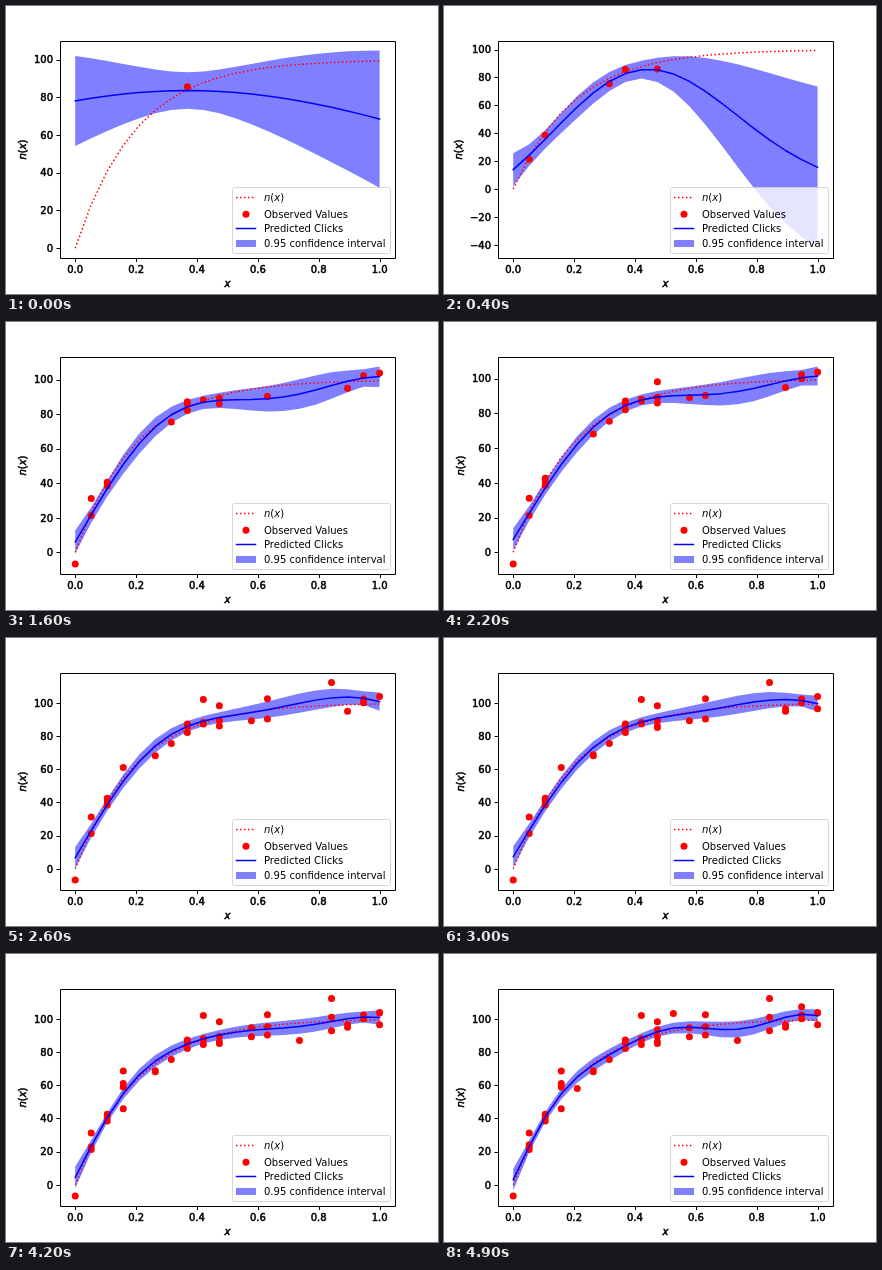
An HTML page that plays this animation: 432x288 px, repeating every 5000 ms.

```html
<!DOCTYPE html>
<html lang="en">
<head>
<meta charset="utf-8">
<title>Gaussian process regression</title>
<style>
  html, body { margin: 0; width: 100%; height: 100%; overflow: hidden; background: #fff; }
  svg { display: block; width: 100vw; height: 100vh; }
  text { font: 10px "DejaVu Sans", sans-serif; }
  .it { font-style: italic; }
  .axis text { stroke: #000; stroke-width: .5px; }
  .axis path { fill: none; stroke: #000; }
  .truth { fill: none; stroke: #f00; stroke-width: 1.5; stroke-dasharray: 1.5 2.475; }
  .mean { fill: none; stroke: #00f; stroke-width: 1.5; stroke-linecap: square; stroke-linejoin: round; }
  .band { fill: #00f; fill-opacity: .5; }
  .dot { fill: none; stroke: #f00; stroke-width: 7; stroke-linecap: round; }
</style>
</head>
<body>
<svg viewBox="0 0 432 288">
  <clipPath id="area"><rect x="54" y="34.56" width="334.8" height="217.44"/></clipPath>
  <g clip-path="url(#area)">
    <path class="band" id="band"/>
    <path class="truth" id="truth"/>
    <path class="dot" id="dots"/>
    <path class="mean" id="mean"/>
  </g>
  <g class="axis">
    <path d="M54.5 35.5H389.5V252.5H54.5Z"/>
    <path id="marks"/>
    <g id="xnums" text-anchor="middle"></g>
    <g id="ynums" text-anchor="end"></g>
    <text class="it" x="221.4" y="281" text-anchor="middle">x</text>
    <text id="ylabel" text-anchor="middle"><tspan class="it">n</tspan>(<tspan class="it">x</tspan>)</text>
  </g>
  <g>
    <rect x="226.5" y="181.5" width="158" height="66" rx="2" fill="#fff" fill-opacity=".8" stroke="#ccc" stroke-opacity=".8"/>
    <path class="truth" d="M230 191.5h20"/>
    <path class="dot" d="M240 208.3h0"/>
    <path class="mean" d="M230.5 222.5h19"/>
    <rect class="band" x="230" y="234" width="20" height="7"/>
    <text x="258" y="195"><tspan class="it">n</tspan>(<tspan class="it">x</tspan>)</text>
    <text x="258" y="211.5">Observed Values</text>
    <text x="258" y="226.3">Predicted Clicks</text>
    <text x="258" y="241">0.95 confidence interval</text>
  </g>
</svg>
<script>
const $ = id => document.getElementById(id);
const STEP = 100, ARMS = 20, AMP = 1000, NOISE = 25;

// Observations in order: arm index, clicks
const obs = [
  [7, 85.7], [9, 86], [6, 75.5], [2, 38.5], [1, 21.3], [17, 95], [7, 87.2], [9, 89.3], [19, 103.8],
  [0, -6.8], [18, 102.3], [12, 90.3], [2, 40.6], [1, 31.2], [7, 82.2], [8, 88.2], [19, 103.9],
  [9, 98.3], [11, 89.2], [5, 68.2], [18, 100], [2, 42.6], [8, 87.2],
  [3, 61], [8, 102], [16, 112.3], [12, 102.5], [17, 96.5], [19, 96.5], [9, 85.2], [5, 68.8],
  [19, 103.6], [3, 59], [16, 101], [11, 94.6], [3, 68.6], [14, 87],
  [12, 95.2], [8, 84.6], [3, 45.8], [16, 92.8], [1, 22.8], [2, 41.5],
  [4, 58], [18, 107.3], [10, 103.2], [9, 93.5], [19, 103.8], [1, 24.2], [19, 103.7]
];
const arms = Array.from({ length: ARMS }, (_, i) => i);
const truth = arms.map(i => 100 * (1 - Math.exp(-5 * i / (ARMS - 1))));

// Forward substitution: solves L z = b
function solve(L, b) {
  const z = [];
  for (let i = 0; i < b.length; i++) {
    let s = b[i];
    for (let j = 0; j < i; j++) s -= L[i][j] * z[j];
    z.push(s / L[i][i]);
  }
  return z;
}
const dot = (a, b) => a.reduce((s, v, i) => s + v * b[i], 0);

// Gaussian process with RBF kernel, length exp(e)
function model(data, e) {
  const len = Math.exp(e);
  const k = arms.map(d => AMP * Math.exp(-((d / (ARMS - 1) / len) ** 2) / 2));
  const L = [];
  let logDet = 0;
  data.forEach(([a], i) => {
    const row = L[i] = [];
    for (let j = 0; j <= i; j++) {
      let s = k[Math.abs(a - data[j][0])] + (i === j ? NOISE : 0);
      for (let m = 0; m < j; m++) s -= row[m] * L[j][m];
      row.push(i === j ? Math.sqrt(s) : s / L[j][j]);
    }
    logDet += Math.log(row[i]);
  });
  const z = solve(L, data.map(p => p[1]));
  return { k, L, z, score: -dot(z, z) / 2 - logDet };
}

// Length scale of highest marginal likelihood
function fit(data) {
  let e = 0, best = model(data, 0);
  const attempt = t => {
    const m = model(data, t);
    if (m.score <= best.score + 1e-7) return false;
    best = m;
    e = t;
    return true;
  };
  for (let t = -3; t <= 2; t += 0.1) attempt(t);
  for (let h = 0.05; h > 0.002; h /= 2) attempt(e + h) || attempt(e - h);
  return best;
}

function predict(data) {
  const { k, L, z } = fit(data);
  const mean = [], low = [], high = [];
  for (const a of arms) {
    const v = solve(L, data.map(p => k[Math.abs(a - p[0])]));
    const m = dot(v, z), w = 1.96 * Math.sqrt(Math.max(0, AMP - dot(v, v)));
    mean.push(m);
    low.push(m - w);
    high.push(m + w);
  }
  const ys = [...truth, ...low, ...high, ...data.map(p => p[1])];
  const min = Math.min(...ys), max = Math.max(...ys), pad = (max - min) * 0.05;
  return { data, mean, low, high, min: min - pad, max: max + pad };
}
const states = obs.map((_, i) => predict(obs.slice(0, i + 1)));

const px = i => 54 + 334.8 * (i / (ARMS - 1) + 0.05) / 1.1;
const snap = v => Math.floor(v + 0.5) + 0.5;
const label = (x, y, s) => `<text x="${x}" y="${y}">${s}</text>`;
const xticks = [0, 1, 2, 3, 4, 5].map(t => px(t * (ARMS - 1) / 5));
$("xnums").innerHTML = xticks.map((x, t) => label(x, 267, (t / 5).toFixed(1))).join("");

function tickStep(range) {
  const raw = range / 9, mag = 10 ** Math.floor(Math.log10(raw));
  return mag * [1, 2, 2.5, 5, 10].find(s => s * mag >= raw);
}

function draw(s) {
  const py = v => 252 - 217.44 * (v - s.min) / (s.max - s.min);
  const pts = list => list.map((v, i) => px(i).toFixed(2) + " " + py(v).toFixed(2));
  const line = list => "M" + pts(list).join("L");
  $("truth").setAttribute("d", line(truth));
  $("mean").setAttribute("d", line(s.mean));
  $("band").setAttribute("d", line(s.low) + "L" + pts(s.high).reverse().join("L") + "Z");
  $("dots").setAttribute("d", s.data.map(([a, v]) => `M${px(a)} ${py(v)}h0`).join(""));

  const step = tickStep(s.max - s.min);
  let marks = xticks.map(x => `M${snap(x)} 252.5v3.5`).join("");
  let nums = "", width = 0;
  for (let n = Math.ceil(s.min / step); n * step <= s.max; n++) {
    const v = Math.round(n * step), y = py(v);
    const name = (v < 0 ? "\u2212" : "") + Math.abs(v);
    marks += `M54.5 ${snap(y)}h-4`;
    nums += label(47, y + 3.7, name);
    width = Math.max(width, String(Math.abs(v)).length * 6.36 + (v < 0 ? 8.38 : 0));
  }
  $("marks").setAttribute("d", marks);
  $("ynums").innerHTML = nums;
  $("ylabel").setAttribute("transform", `translate(${39.1 - width} 143.5) rotate(-90)`);
}

let shown = -1;
const start = performance.now();
function tick(now) {
  const i = Math.floor(Math.max(0, now - start) / STEP) % states.length;
  if (i !== shown) draw(states[shown = i]);
  requestAnimationFrame(tick);
}
tick(start);
</script>
</body>
</html>
```
